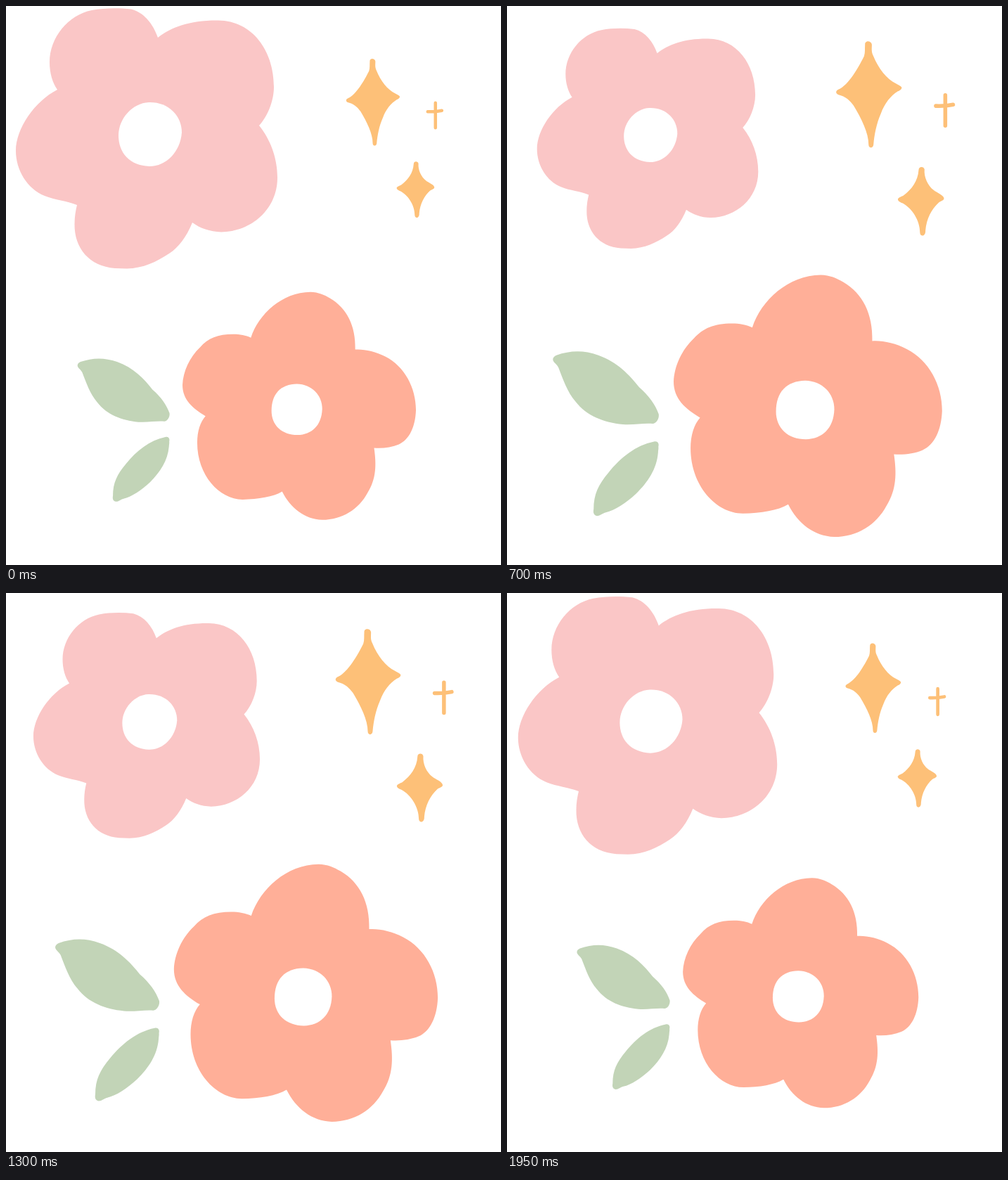
Write an HTML page with a canvas that moves like this. It is 704 px wide and 795 px high and loops after 2 s.

```html
<!DOCTYPE html>
<html lang="en">
<head>
<meta charset="utf-8">
<title>Pulsing flowers</title>
<style>
html, body { margin: 0; width: 100%; height: 100%; overflow: hidden; background: #fff; }
canvas { display: block; }
</style>
</head>
<body>
<canvas id="stage" width="704" height="795"></canvas>
<script>
const ctx = document.getElementById('stage').getContext('2d');
const LOOP = 2000, STEP = 50;

const PINK = '#fac6c6', CORAL = '#ffaf98', GREEN = '#c2d4b7', GOLD = '#fdc078', WHITE = '#fff';

const fill = (color, d) => {
  const path = new Path2D(d);
  return () => { ctx.fillStyle = color; ctx.fill(path); };
};
const stroke = (color, width, d) => {
  const path = new Path2D(d);
  return () => {
    ctx.strokeStyle = color;
    ctx.lineWidth = width;
    ctx.lineCap = ctx.lineJoin = 'round';
    ctx.stroke(path);
  };
};

// Each group scales about (x, y); keys are [time, scale].
const groups = [
  {
    x: 200, y: 189,
    keys: [[0, 1], [930, 0.795], [LOOP, 1]],
    parts: [
      fill(PINK, `M216 45 C235 30 262 20 302 20.5 C350 21 381 63 381 115 C381 135 372 157 360 170
        C376 190 386 216 386 244 C386 290 348 321 306 321.5 C290 321 276 316 265 308
        C257 328 245 344 232 352 C214 364 195 373 172 373.5 L155 373 C118 370 97 344 97.5 310
        C97.5 300 99 291 101 283 C86 277 70 276 55 270 C30 260 14 233 14 206
        C14 175 40 136 73 119 C66 109 62 95 62 80 C62 45 88 13 122 6
        C140 2.5 160 2.5 178 4.5 C196 9 209 25 216 45Z`),
      fill(WHITE, `M203 137 C230 136 250 155 250 180 C248 207 228 228 204 228
        C176 227 160 209 160 184 C160 160 180 138 203 137Z`)
    ]
  },
  {
    x: 344.5, y: 569,
    keys: [[0, 0.8384], [930, 1.0054], [LOOP, 0.8384]],
    parts: [
      fill(CORAL, `M349 453 C362 413 402 376 450 375.5 C464 376 473 380 483 386
        C512 403 527 433 526 473 C541 472 560 476 577 485 C610 502 629 538 629 576
        C628 604 618 626 600 634 C588 639 573 641 558 640 C562 668 562 692 547 716
        C532 744 504 762 470 762 C440 761 416 742 402 714 C387 723 362 727 335 727.5
        C295 727 258 686 258 631 C258 612 263 596 272 586 C250 573 233 558 233 533
        C234 510 245 486 263 469 C276 454 293 447 319 447 C330 447 341 449 349 453Z`),
      fill(WHITE, `M427 531.5 C452 532 470 550 470 574 C469 602 452 617.5 428 618
        C402 618 384 602 384 577 C384 548 400 532 427 531.5Z`),
      fill(GREEN, `M60 494 C80 487 100 486 122 494 C150 504 168 523 182 541
        C197 554 206 567 211 581 C212 588 207 595 202 595 C188 594 175 597 158 596
        C130 593 105 584 88 562 C76 548 70 530 63 512 C60 506 54 504 55 499 C56 496 58 495 60 494Z`),
      fill(GREEN, `M204 621.5 C209 620 212 624 210.5 629 C211 632 210 635 210 638
        C208 662 195 681 178 698 C163 712 146 723 133 726 C128 727 125 731 120 731
        C115 730 114 726 115 721 C115 699 122 685 137 667 C155 645 177 627 204 621.5Z`)
    ]
  },
  {
    x: 554.3, y: 186.6,
    keys: [[0, 0.756], [535, 1.046], [928, 0.756], [1500, 1.005], [LOOP, 0.756]],
    parts: [
      fill(GOLD, `M505.5 44 C505 37.5 515 37.5 516 44 C516 50 515 55 518 61
        C526 81 539 97 553 104 C556 106 560 107 562 110 C562 113 559 115 556 116
        C545 123 536 134 530 150 C523 166 520 182 518.5 198 C518 204 511 204 511 198
        C511 180 500 158 488 138 C482 130 476 124 464 121 C460 119 460 115 465 113
        C480 106 495 80 504 62 C506 56 505 50 505.5 44Z`),
      fill(GOLD, `M588 237 C588 231 596 231 597 236 C596 248 602 261 611 268
        C616 272 627 276 627 281 C627 284 622 285 619 287 C608 297 600 312 598.5 330
        C599 340 590 340 590 333 C590 315 578 296 563 288 C560 287 556 285 556 282
        C557 279 562 278 565 276 C577 267 587 254 588 237Z`),
      stroke(GOLD, 6, 'M629 122 V169 M614.5 138.5 Q629 139 641 136.5')
    ]
  }
];

function scaleAt(keys, t) {
  const i = keys.findIndex(k => k[0] > t);
  const [t0, s0] = keys[i - 1], [t1, s1] = keys[i];
  return s0 + (s1 - s0) * (t - t0) / (t1 - t0);
}

function draw(t) {
  ctx.fillStyle = WHITE;
  ctx.fillRect(0, 0, 704, 795);
  for (const { x, y, keys, parts } of groups) {
    const s = scaleAt(keys, t);
    ctx.save();
    ctx.translate(x, y);
    ctx.scale(s, s);
    ctx.translate(-x, -y);
    parts.forEach(part => part());
    ctx.restore();
  }
}

const start = performance.now();
function tick() {
  const t = Math.max(0, performance.now() - start) % LOOP;
  draw(Math.floor(t / STEP) * STEP);
  requestAnimationFrame(tick);
}
tick();
</script>
</body>
</html>
```
